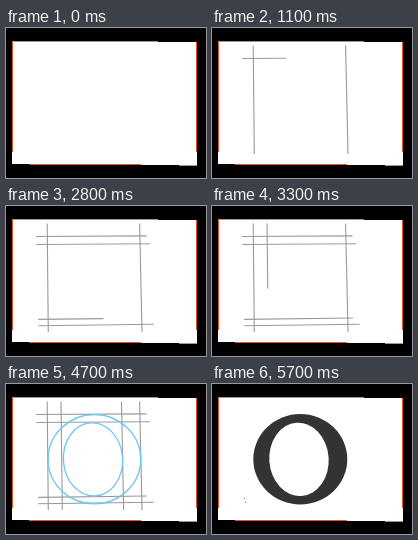
Recreate the animation shown at these times as an HTML page. Size 200 by 150 pixels, loop 8000 ms.

```html
<!DOCTYPE html>
<html lang="en">
<head>
<meta charset="utf-8">
<title>Constructing the letter O</title>
<style>
  html, body { margin: 0; width: 100%; height: 100%; overflow: hidden; background: #000; }
  svg { display: block; width: 100%; height: 100%; }
  #guides { stroke: #9b9898; stroke-width: 1.1; }
  #outer, #inner { fill: none; stroke: #6ac6f6; stroke-width: 1.3; }
  #letter { fill: #333334; }
</style>
</head>
<body>
<svg viewBox="0 0 200 150">
  <path fill="#fff" d="M6 14H191V137H23V136H6Z"/>
  <path stroke="#999" d="M6 13.5H152M173 137.5H191"/>
  <path stroke="#ee4f20" d="M6.5 14V124M190.5 14V124M23 136.5H135"/>
  <g id="guides"></g>
  <ellipse id="outer" cx="88.4" cy="75.2" rx="46.3" ry="44.6"/>
  <ellipse id="inner" cx="87" cy="75.4" rx="29.6" ry="36.6" transform="rotate(-4 87 75.4)"/>
  <g id="letter">
    <ellipse cx="88.3" cy="75.2" rx="47" ry="45.2"/>
    <ellipse fill="#fff" cx="87" cy="75.4" rx="29.7" ry="36.7" transform="rotate(-4 87 75.4)"/>
  </g>
  <path id="specks" fill="#888" d="M32 114h1v1h-1zM33 118h1v1h-1z"/>
</svg>
<script>
const LOOP = 8000, STEP = 100, DRAW_STEPS = 5;
const $ = id => document.getElementById(id);

// Hand-ruled guides: the lean grows with the distance from the corner.
const vertical = (start, x) =>
  ({ start, x, y: 17.5, dx: .5 + x / 70, dy: 108.5 });
const horizontal = (start, y, end) => {
  const x = 29.4 + y / 40;
  return { start, x, y: y + .5, dx: end - x, dy: -.4 - y / 120 };
};

const guides = [
  vertical(0, 41.2),
  vertical(5, 133.6),
  horizontal(9, 30, 140.5),
  horizontal(14, 119.2, 147.7),
  horizontal(19, 38, 144),
  horizontal(25, 112.9, 141),
  vertical(30, 55),
  vertical(35, 115.5)
];

for (const g of guides) {
  g.el = document.createElementNS('http://www.w3.org/2000/svg', 'path');
  $('guides').append(g.el);
}

// When each part is visible, in ms
const spans = {
  guides: [0, 5700],
  outer: [4200, 5200],
  inner: [4700, 5200],
  letter: [5200, LOOP],
  specks: [5700, LOOP]
};

function draw(t) {
  const step = Math.floor(t / STEP);
  for (const { el, start, x, y, dx, dy } of guides) {
    const p = Math.max(0, Math.min(1, (step - start) / DRAW_STEPS));
    el.setAttribute('d', p ? `M${x} ${y}l${dx * p} ${dy * p}` : '');
  }
  for (const [id, [from, to]] of Object.entries(spans)) {
    $(id).style.display = t >= from && t < to ? '' : 'none';
  }
}

const origin = performance.now();
function tick() {
  draw((performance.now() - origin) % LOOP);
  requestAnimationFrame(tick);
}
tick();
</script>
</body>
</html>
```
